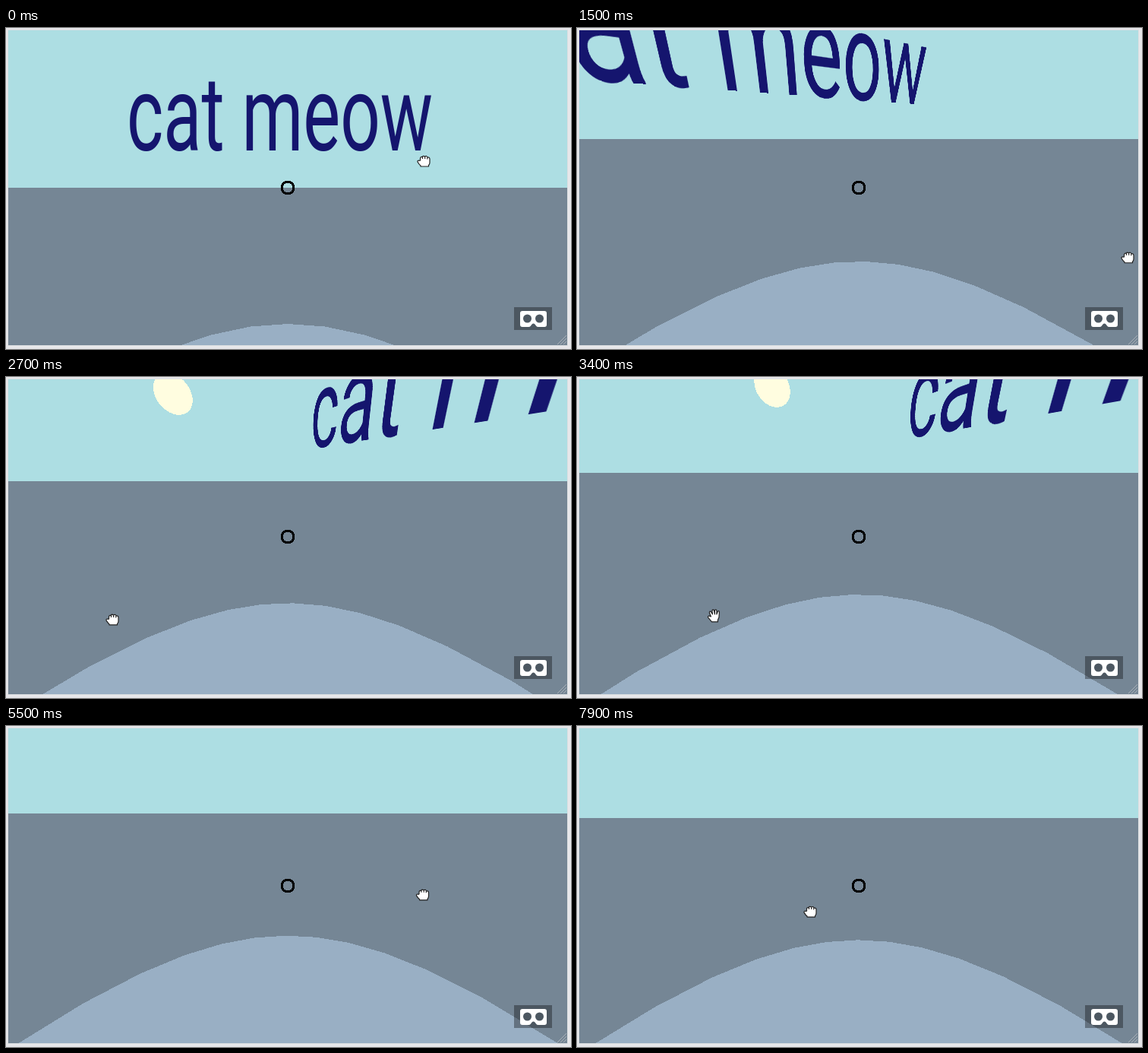
Recreate the animation shown at these times as an HTML page. Size 744 by 422 pixels, loop 8 s.

```html
<!DOCTYPE html>
<html lang="en">
<head>
<meta charset="utf-8">
<title>Panorama</title>
<style>
html, body { margin: 0; width: 100%; height: 100%; overflow: hidden; background: #e7e7ea; }
#view {
  position: absolute; left: 3px; top: 3px; width: 736px; height: 414px;
  overflow: hidden; background: #addee3; perspective: 246.7px; outline: 1px solid #dcdfe1;
}
#scene { position: absolute; inset: 0; shape-rendering: crispEdges; }
#icon, #hand { shape-rendering: auto; }
#label {
  position: absolute; left: 368px; top: 207px; width: 1px; height: 1px;
  overflow: visible; transform-origin: 0 0; font: 274px Roboto, sans-serif; fill: #15156e;
}
</style>
</head>
<body>
<div id="view">
  <svg id="label"><text>cat meow</text></svg>
  <svg id="scene" viewBox="-368 -207 736 414">
    <polygon id="sun" fill="#fffde0"/>
    <rect id="ground" x="-368" width="736" height="500" fill="#758695"/>
    <polygon id="disc" fill="#99afc4"/>
    <circle r="8" fill="none" stroke="#000" stroke-width="3"/>
    <g id="icon" transform="translate(298 157)">
      <path d="M0 0h50v30h-50z" opacity=".35"/>
      <path fill="#fff" fill-rule="evenodd" d="M11 5H40Q43 5 43 8V23Q43 26 40 26H32Q30 26 29 24.500L27.500 22.500Q25.500 20.500 23.500 22.500L22 24.500Q21 26 19 26H11Q8 26 8 23V8Q8 5 11 5Z
        M12 15a5.500 5.500 0 1 0 11 0a5.500 5.500 0 1 0 -11 0Z M28 15a5.500 5.500 0 1 0 11 0a5.500 5.500 0 1 0 -11 0Z"/>
    </g>
    <path d="M355 206l12-12M359 206l8-8M363 206l4-4" stroke="#aab1b8" fill="none"/>
    <g id="hand" fill="#fff" stroke="#222" stroke-width="1.200" stroke-linejoin="round">
      <path id="fist" d="M-4.500-.5V-3Q-4.500-6-2-5.500Q-.5-7.500 1.500-6Q4-7.500 5-5Q8-5.500 8-2.500V2Q8 4 6.500 5.500V7H-4V6Q-6 4.500-8 1Q-8.500-1.500-4.500-.5M-1.500-5.500V-3M1.700-6V-3M4.800-5V-2.500"/>
      <path id="palm" d="M-4 1L-6-4Q-6-6.500-4-5.500L-2-2L-2.500-7Q-1-9 0-7L1-2V-7.500Q2.500-9 3.500-7V-2L5-6Q7-7 7-5L6.500 2L5 5.500V8H-3L-8 2Q-8-1-4 1Z"/>
    </g>
  </svg>
</div>
<script>
const FOCAL = 246.7, STEP = Math.PI / 16, LOOP = 8000, RAD_PER_PX = .002;
const { sin, cos, tan, ceil, floor, PI } = Math;
const [label, sun, ground, disc, hand, fist, palm] =
  ['label', 'sun', 'ground', 'disc', 'hand', 'fist', 'palm'].map(id => document.getElementById(id));

// Each drag: start time, where the hand grabs, and turns as [time, yaw, downward pitch].
const drags = [
  { at: 200, grab: [550, 175], turns: [[600, .05, .1765], [1500, .35, .2535], [2700, -.82, .2878], [3200, -.934, .329]] },
  { at: 4100, grab: [424, 250], turns: [[4300, -1.648, .3569], [4600, -1.97, .36]] },
  { at: 5000, grab: [636, 218], turns: [[5500, -2.145, .3677], [5700, -2.44, .382], [6600, -3.156, .35]] },
  { at: 7400, grab: [690, 246], turns: [[7700, -3.65, .371], [7900, -3.922, .3462]] }
];

// The hand moves with the view while dragging, and glides to the next grab between drags.
const track = [], rests = [];
let view = [0, 0];
for (const { at, grab, turns } of drags) {
  if (track.length) rests.push([track.at(-1)[0] + 200, at - 100]);
  for (const t of [at - 200, at]) track.push([t, ...grab, ...view]);
  const start = view;
  for (const [t, ...turn] of turns) {
    track.push([t, ...grab.map((g, i) => g + (turn[i] - start[i]) / RAD_PER_PX), ...turn]);
    view = turn;
  }
}
track.push([LOOP, ...track.at(-1).slice(1)]);

function pose(t) {
  const i = track.findIndex(k => k[0] > t), a = track[i - 1], b = track[i];
  const p = (t - a[0]) / (b[0] - a[0]);
  return a.map((v, j) => v + (b[j] - v) * p).slice(1);
}

function draw(t) {
  const [x, y, yaw, pitch] = pose(t);
  const project = (azimuth, radius, height) => {
    const z = radius * cos(azimuth - yaw);
    const k = FOCAL / (z * cos(pitch) - height * sin(pitch));
    return [k * radius * sin(azimuth - yaw), -k * (height * cos(pitch) + z * sin(pitch))];
  };

  label.style.transform = `translateZ(${FOCAL}px) rotateX(${-pitch}rad) rotateY(${yaw}rad)
    translate3d(-212px, -49px, ${-FOCAL}px) scale(.3365, .5)`;
  label.style.display = yaw < -1.7 ? 'none' : '';
  ground.setAttribute('y', -FOCAL * tan(pitch));

  const rim = [];
  for (let k = ceil((yaw - 1.4) / STEP); k <= (yaw + 1.4) / STEP; k++)
    rim.push(project(k * STEP, 1.378, -1));
  disc.setAttribute('points', rim.join(' '));

  const az = -1.298, up = .322, size = .0642;
  sun.style.display = cos(az - yaw) > .4 ? '' : 'none';
  sun.setAttribute('points', Array.from({ length: 36 }, (_, i) => {
    const a = i * PI / 18, h = up + size * sin(a);
    return project(az + size * cos(a) / cos(up), cos(h), sin(h));
  }).join(' '));

  const open = rests.some(([from, to]) => t >= from && t < to);
  fist.style.display = open ? 'none' : '';
  palm.style.display = open ? '' : 'none';
  hand.setAttribute('transform', `translate(${x - 371} ${y - 210})`);
}

function tick() {
  draw(floor(performance.now() % LOOP / 100) * 100);
  requestAnimationFrame(tick);
}
tick();
</script>
</body>
</html>
```
